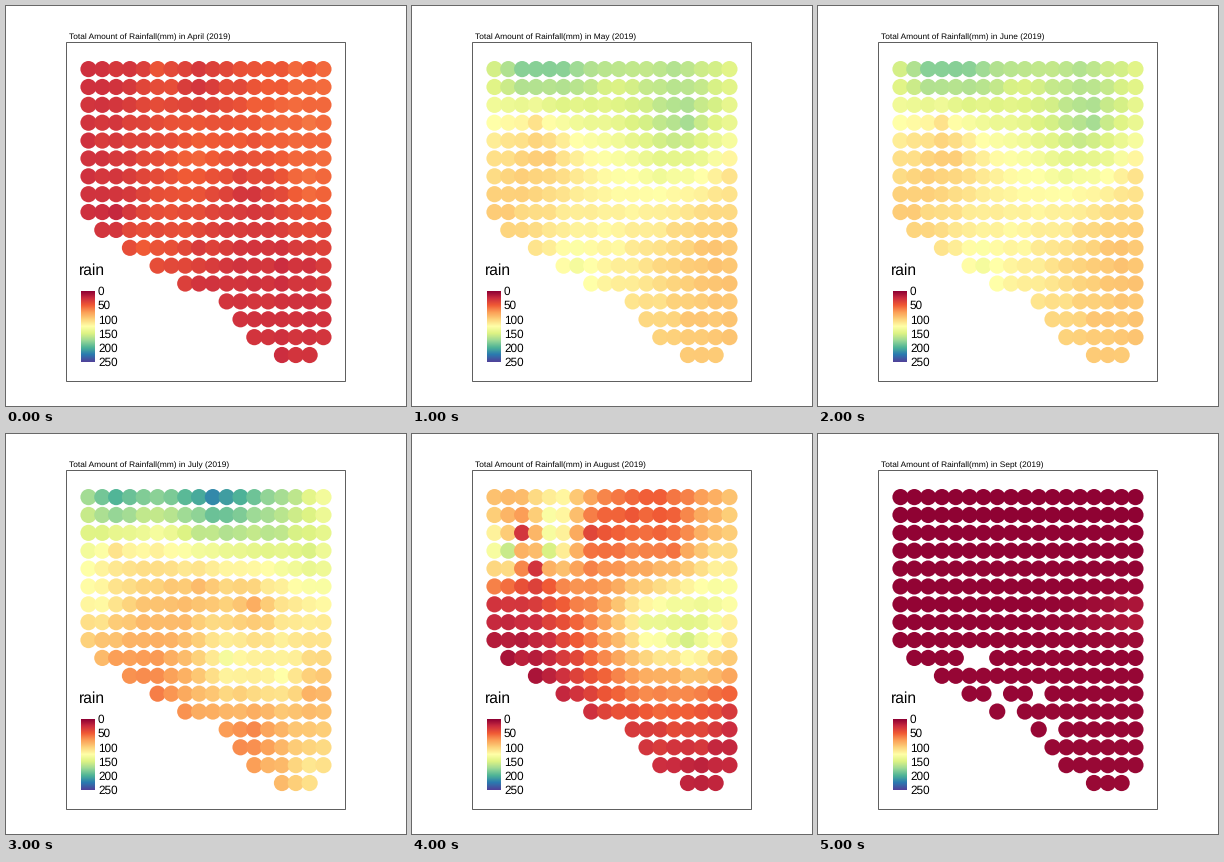
Recreate the animation shown at these times as a matplotlib script. Size 400 by 400 pixels, loop 6 s.

```python
import numpy as np
import matplotlib.pyplot as plt
from matplotlib.animation import FuncAnimation
from matplotlib.colors import LinearSegmentedColormap
from matplotlib.patches import Rectangle

SIZE, DPI = 400, 100
PX = 72 / DPI
RADIUS = 8.1

plt.rcParams.update({"font.family": "Liberation Sans",
                     "text.hinting": "none", "text.hinting_factor": 8})
spectral = LinearSegmentedColormap.from_list("rain", [
    "#8d0033", "#cb2c3f", "#f05a35", "#fb9f57", "#fdd27b", "#ffffa8",
    "#def384", "#9cd996", "#4fb497", "#2a7bb0", "#4f439a"], N=500)


def first_col(row):
    return int(np.interp(row, [8, 9, 12, 13, 16], [0, 1, 7, 10, 14]) + 0.01)


cells = np.array([(c, r) for r in range(17)
                  for c in range(first_col(r), 17 if r == 16 else 18)])
cols, rows = cells.T


def distance(a, b):
    return np.linalg.norm(a[:, None] - b[None], axis=2)


def rainfall(seed, noise, *points):
    """Smooth surface through (col, row, mm) key points, lightly roughened."""
    points = np.array(points, float)
    knots, mm = points[:, :2], points[:, 2]
    n = len(points)
    system = np.ones((n + 1, n + 1))
    system[:n, :n] = distance(knots, knots)
    system[n, n] = 0
    weights = np.linalg.solve(system, np.append(mm, 0))
    surface = distance(cells, knots) @ weights[:n] + weights[n]
    return surface + np.random.default_rng(seed).normal(0, noise, len(cells))


april = rainfall(
    4, 1.5, (0, 0, 28), (3, 0, 30), (5, 0, 47), (14, 0, 50), (8, 1, 31),
    (14, 3, 57), (8, 4.5, 56), (0, 6, 30), (12, 7, 31), (16, 7, 55),
    (2, 8, 24), (4, 10, 50), (17, 9, 42), (15, 11, 28), (8, 12, 32))

may = rainfall(
    5, 1.5, (0, 0, 155), (2, 0.5, 182), (5, 0.5, 178), (9, 1, 151),
    (14, 0.5, 162), (17, 0, 149), (3, 3, 108), (14, 3, 170), (12, 4, 156),
    (4, 5, 101), (10, 6, 126), (17, 6, 111), (0, 8, 97), (9, 8, 118),
    (15, 10, 94), (6, 11, 130), (15, 14, 96))

july = rainfall(
    7, 2, (0, 0, 172), (2, 0.5, 200), (9, 0, 220), (11, 0, 200),
    (17, 0, 135), (5, 2, 132), (14, 2, 160), (2, 3, 110), (16, 3, 150),
    (8, 5, 92), (1, 6, 122), (12, 6, 82), (2, 9, 78), (10, 9, 132),
    (14, 10, 128), (5, 11, 62), (16, 11, 82), (12, 13, 67), (16, 15, 112))

august = rainfall(
    8, 2, (0, 0, 95), (5, 0, 120), (12, 0, 50), (4, 1, 132), (17, 1, 95),
    (2, 2, 35), (7, 2, 42), (1, 3, 158), (4, 3, 150), (13, 3, 60),
    (3, 4, 28), (16, 5, 132), (0, 6, 29), (11, 7, 138), (14, 8, 156),
    (8, 9, 64), (3, 10, 12), (13, 10, 82), (10, 13, 35), (17, 12, 32))

# Dry month: a faint wet patch at the right edge and a few empty cells.
sept = 1 + 0.25 * rows + 13 * np.exp(
    -((cols - 18) / 4.5) ** 2 - ((rows - 6.6) / 1.2) ** 2)
for gap in [(5, 9), (6, 9), (7, 11), (10, 11), (8, 12), (11, 13)]:
    sept[(cells == gap).all(axis=1)] = np.nan

MONTHS = [("April", april), ("May", may), ("June", may),
          ("July", july), ("August", august), ("Sept", sept)]

fig = plt.figure(figsize=(SIZE / DPI, SIZE / DPI), dpi=DPI, facecolor="white")
ax = fig.add_axes([0, 0, 1, 1])
ax.axis("off")


def label(x, y, text, px):
    return ax.text(x, y, text, fontsize=px * PX, color="black", va="baseline")


ax.add_patch(Rectangle((60.5, 36.5), 279, 339, fill=False, snap=False,
                       edgecolor="#606060", linewidth=PX))
dots = ax.scatter(82.5 + 13.82 * cols, 63.1 + 17.87 * rows,
                  s=(2 * RADIUS * PX) ** 2, linewidths=0, zorder=3)
title = label(63, 33, "", 8.35)
label(73, 269, "rain", 15.6)
ax.imshow(np.linspace(0, 1, 142)[:, None], cmap=spectral, aspect="auto",
          extent=(74.5, 88.5, 356, 285), interpolation="nearest")
for i in range(6):
    label(92, 289.3 + 14.05 * i, str(50 * i), 11.8)
ax.set_xlim(0, SIZE)
ax.set_ylim(SIZE, 0)


def draw(i):
    month, rain = MONTHS[i]
    title.set_text(f"Total Amount of Rainfall(mm) in {month} (2019)")
    colors = spectral(np.nan_to_num(rain) / 250)
    colors[np.isnan(rain), 3] = 0
    dots.set_facecolors(colors)
    return dots, title


anim = FuncAnimation(fig, draw, frames=len(MONTHS), interval=1000,
                     init_func=lambda: draw(0), repeat=True)
plt.show()
```
